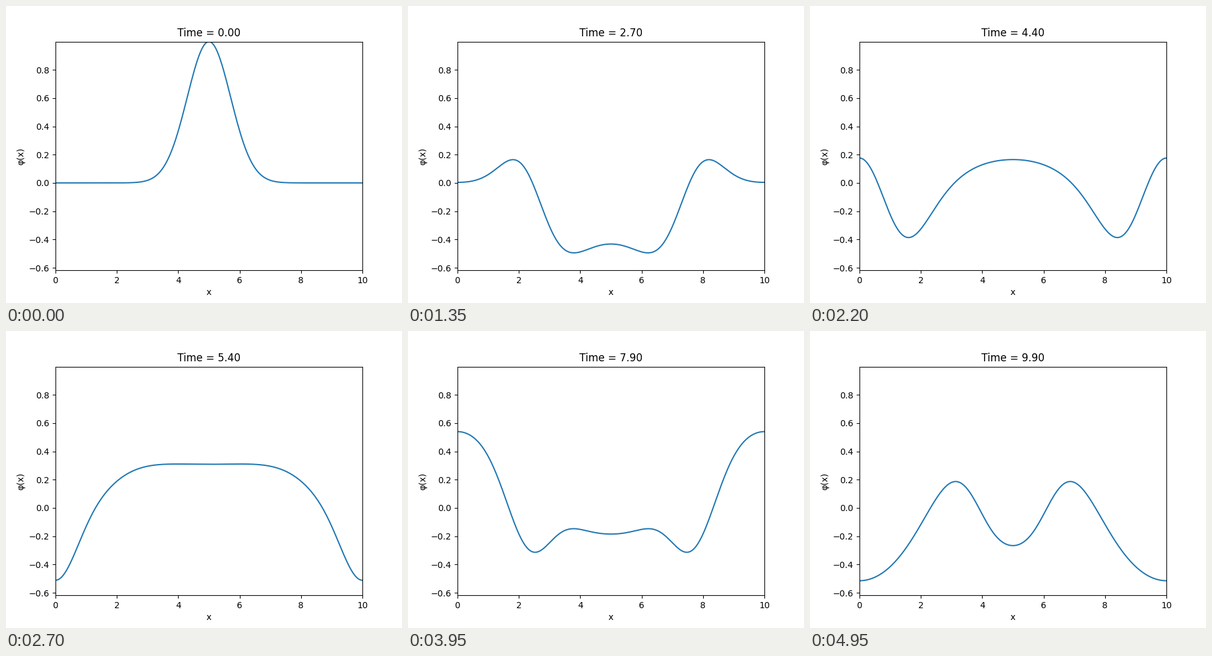
These frames come from a looping animation (640 by 480 pixels, 5 s). A matplotlib script:

```python
import numpy as np
import matplotlib.pyplot as plt
from matplotlib.animation import FuncAnimation

# Klein-Gordon field with unit mass on [0, L], reflecting walls,
# starting at rest from a Gaussian pulse in the middle.
L = 10.0
FRAMES = 100
INTERVAL = 50
DT = 0.1

x = np.linspace(0, L, 200)
modes = np.arange(16)
k = 2 * np.pi * modes / L
omega = np.sqrt(1 + k**2)
amp = np.where(modes == 0, 1, 2) * np.sqrt(np.pi) / L * np.exp(-k**2 / 4)
shapes = np.cos(np.outer(x - L / 2, k))


def field(t):
    return shapes @ (amp * np.cos(omega * t))


phi = np.array([field(i * DT) for i in range(FRAMES)])

fig, ax = plt.subplots(figsize=(6.4, 4.8), dpi=100)
line, = ax.plot(x, phi[0])
ax.set_xlim(0, L)
ax.set_ylim(phi.min(), phi.max())
ax.set_xlabel("x")
ax.set_ylabel("φ(x)")
title = ax.set_title("Time = 0.00")


def update(i):
    line.set_ydata(phi[i])
    title.set_text(f"Time = {i * DT:.2f}")
    return line, title


anim = FuncAnimation(fig, update, frames=FRAMES, interval=INTERVAL,
                     repeat=True, repeat_delay=0, blit=False)
plt.show()
```
